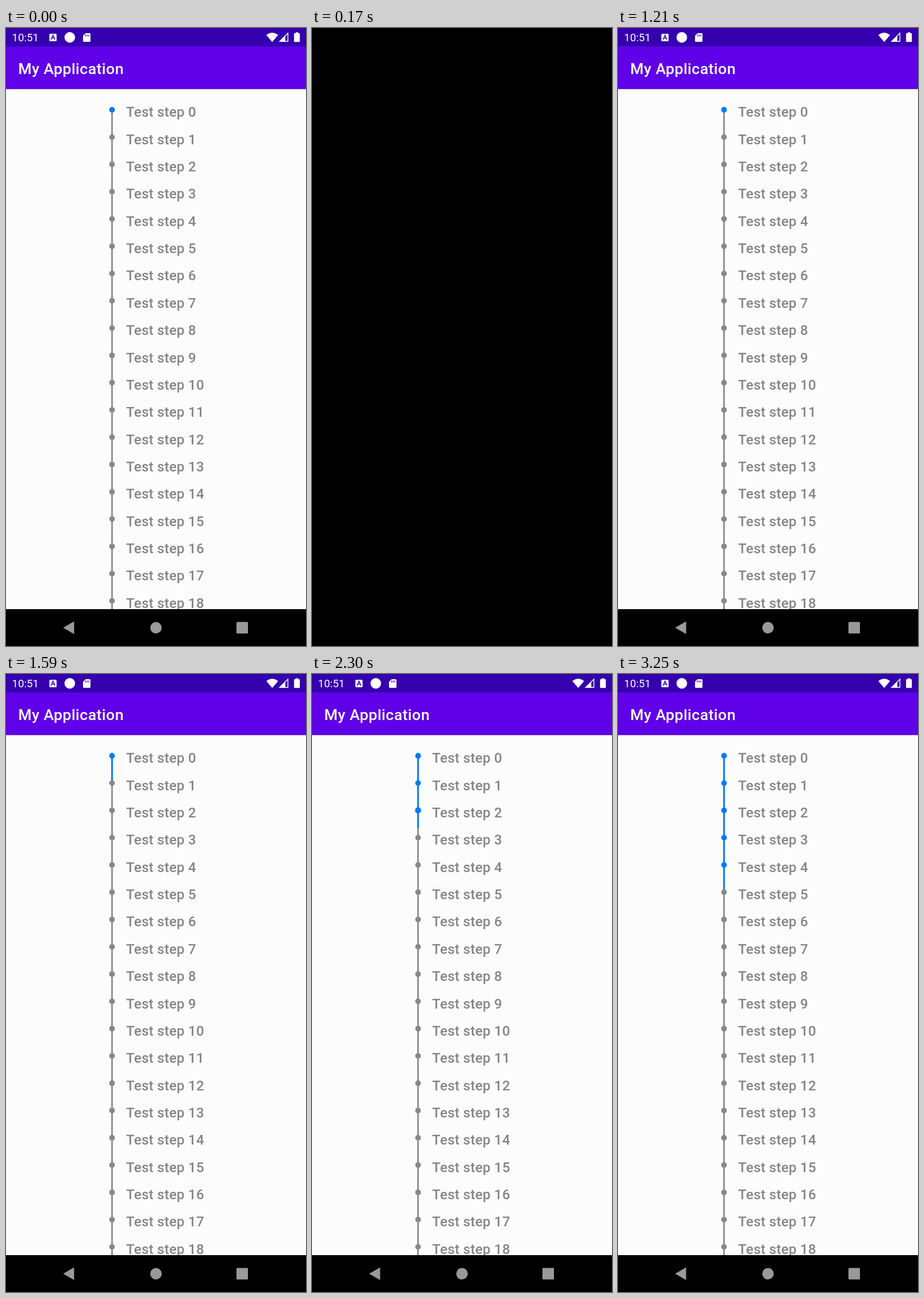
Animation of 522x1073 px, one loop 3.29 s. Source, as an HTML page:

```html
<!DOCTYPE html>
<html lang="en">
<head>
<meta charset="utf-8">
<title>Step progress</title>
<style>
  html, body { margin: 0; width: 100%; height: 100%; overflow: hidden; background: #000; }
  svg { display: block; width: 100%; height: 100%; }
  text { font-family: Roboto, sans-serif; white-space: pre; }
  .clock { font-size: 18.6px; fill: #fff; }
  .title { font-size: 26.7px; font-weight: 500; letter-spacing: .4px; fill: #fff; }
  .label { font-size: 24px; font-weight: 500; letter-spacing: .25px; fill: #858585; }
  .track { stroke: #888; stroke-width: 2.7; }
  .progress { stroke: #007aff; stroke-width: 2.7; }
  .halo { fill: #007aff; opacity: .5; }
</style>
</head>
<body>
<svg viewBox="0 0 522 1073">
  <defs>
    <linearGradient id="shade" x2="0" y2="1">
      <stop stop-color="#000" stop-opacity=".1"/>
      <stop offset="1" stop-color="#000" stop-opacity="0"/>
    </linearGradient>
  </defs>
  <rect width="522" height="1073"/>
  <g id="app">
    <rect width="522" height="1009" fill="#fcfcfd"/>
    <g id="steps">
      <line class="track" x1="184.5" x2="184.5" y1="142" y2="1009"/>
      <line class="progress" id="progress" x1="184.5" x2="184.5" y1="142" y2="142"/>
      <circle class="halo" id="halo" cx="184.5" r="0"/>
    </g>

    <rect y="106" width="522" height="3" fill="url(#shade)"/>
    <rect y="31" width="522" height="75" fill="#5f00e9"/>
    <rect width="522" height="32" fill="#3500ae"/>
    <text class="title" x="21.3" y="80">My Application</text>
    <text class="clock" x="10.6" y="23.3">10:51</text>

    <g fill="#fff">
      <rect x="75.5" y="10" width="12.5" height="13" rx="1.5"/>
      <path d="M78.4 20.2L81.8 12.4L85.2 20.2M79.6 17.6H84" fill="none" stroke="#3500ae" stroke-width="1.5"/>
      <circle cx="111" cy="16.3" r="9.2"/>
      <path d="M138.6 9H145.5Q147 9 147 10.5V22.5Q147 24 145.5 24H135.5Q134 24 134 22.5V13.6Z"/>
      <path d="M138.4 11.5V14.5M141.2 11.5V14.5M144 11.5V14.5" stroke="#3500ae" stroke-width="1.4"/>
      <path d="M453 12.3Q463.2 4.2 473.4 12.3L463.2 24.3Z"/>
      <path d="M490.5 9V23.3H476.2Z" fill="none" stroke="#fff" stroke-width="1.4"/>
      <path d="M486 13V24H475Z"/>
      <path d="M504 9V7.5H508.5V9H510Q511.3 9 511.3 10.3V23Q511.3 24.3 510 24.3H502.5Q501.2 24.3 501.2 23V10.3Q501.2 9 502.5 9Z"/>
    </g>

    <rect y="1009" width="522" height="64"/>
    <g fill="#999">
      <path d="M99.5 1041.3L118.5 1030.3V1052.3Z"/>
      <circle cx="261" cy="1041.3" r="10"/>
      <rect x="401" y="1031.3" width="20" height="20" rx="1.5"/>
    </g>
  </g>
</svg>
<script>
  const LOOP = 3290, BLACK_FROM = 50, BLACK_TO = 1210;
  const STEP_MS = 410, TOP = 142, PITCH = 47.37, COUNT = 19;
  const PULSE_SPAN = 0.82;

  const byId = id => document.getElementById(id);
  const app = byId('app'), steps = byId('steps');
  const progress = byId('progress'), halo = byId('halo');

  function add(tag, attrs, content = '') {
    const el = document.createElementNS(steps.namespaceURI, tag);
    for (const key in attrs) el.setAttribute(key, attrs[key]);
    el.textContent = content;
    return steps.appendChild(el);
  }

  const dots = Array.from({ length: COUNT }, (_, i) => {
    const y = TOP + i * PITCH;
    add('text', { class: 'label', x: 209, y: y + 12.2 }, `Test step ${i}`);
    return add('circle', { cx: 184.5, cy: y, r: 4.9 });
  });

  function render(t) {
    const black = t >= BLACK_FROM && t < BLACK_TO;
    app.setAttribute('visibility', black ? 'hidden' : 'visible');

    const done = Math.max(0, t - BLACK_TO) / STEP_MS;
    const current = Math.floor(done);
    const phase = (done - current) / PULSE_SPAN;
    progress.setAttribute('y2', TOP + done * PITCH);
    dots.forEach((dot, i) => dot.setAttribute('fill', i <= current ? '#007aff' : '#888'));

    // The reached dot swells once and settles.
    halo.setAttribute('cy', TOP + current * PITCH);
    halo.setAttribute('r', phase < 1 ? 10 * Math.sin(Math.PI * phase) : 0);
  }

  const start = performance.now();
  function tick() {
    render((performance.now() - start) % LOOP);
    requestAnimationFrame(tick);
  }
  tick();
</script>
</body>
</html>
```
